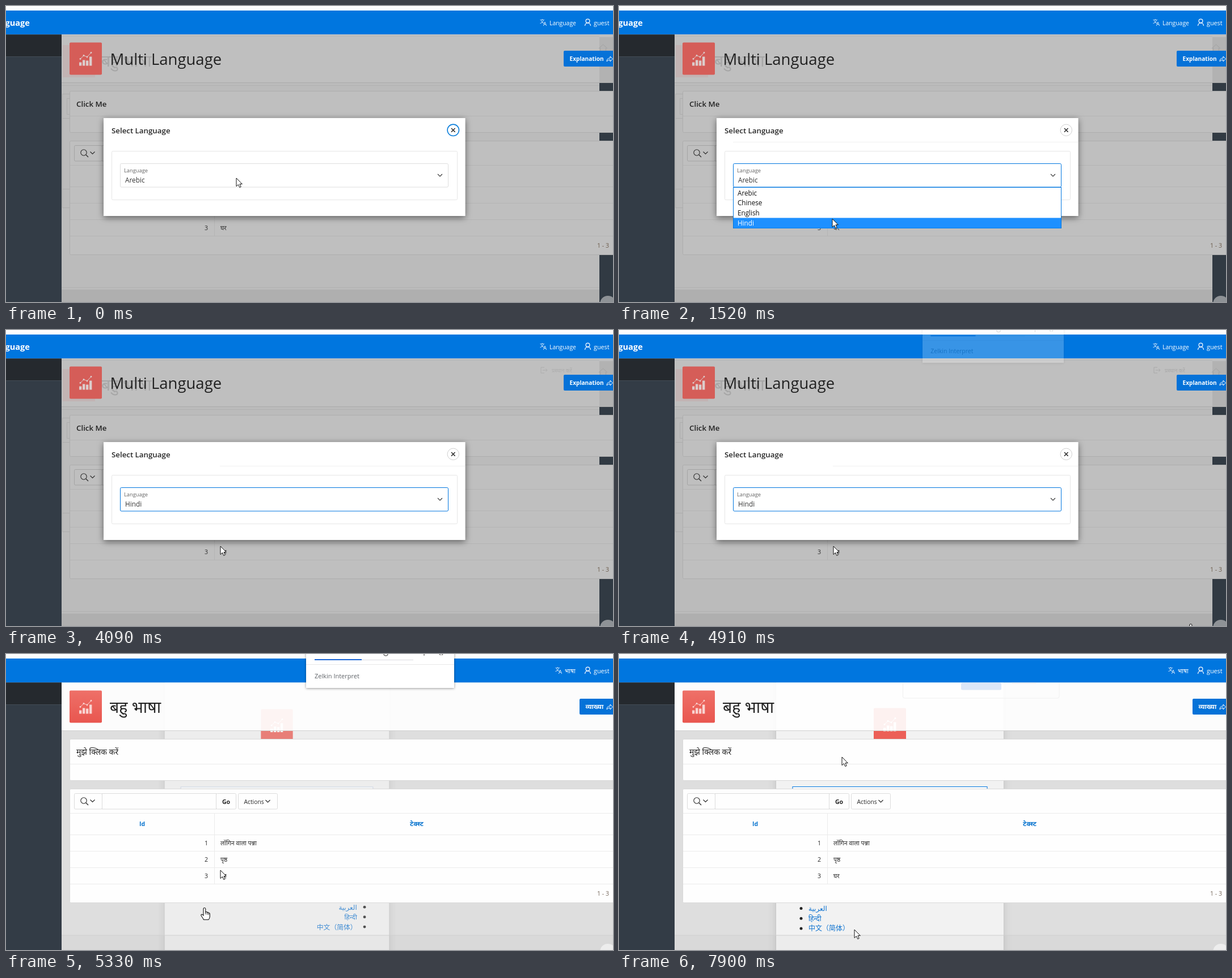
An HTML page for the animation above (8000 ms loop, 1070 by 523 pixels).

```html
<!DOCTYPE html>
<html lang="en">
<head>
<meta charset="utf-8">
<title>Language switch</title>
<style>
html, body { margin: 0; width: 100%; height: 100%; overflow: hidden; background: #fff; }
svg { display: block; width: 100%; height: 100%; }
text { font-family: "Open Sans", "Noto Sans", "Noto Sans Devanagari", "Noto Sans CJK SC", sans-serif; white-space: pre; }
</style>
</head>
<body>
<svg id="stage" viewBox="0 0 1070 523" xmlns="http://www.w3.org/2000/svg"></svg>
<script>
const LOOP = 8000;
const BLUE = '#0076df';

// --- markup helpers ---
const rect = (x, y, w, h, fill, extra = '') =>
  `<rect x="${x}" y="${y}" width="${w}" height="${h}" fill="${fill}" ${extra}/>`;
const box = (x, y, w, h, fill, stroke, r = 2, sw = 1) =>
  rect(x + .5, y + .5, w - 1, h - 1, fill, `stroke="${stroke}" stroke-width="${sw}" rx="${r}"`);
const line = (d, stroke, sw = 1, extra = '') =>
  `<path d="${d}" fill="none" stroke="${stroke}" stroke-width="${sw}" ${extra}/>`;
const text = (x, y, size, str, fill = '#262626', extra = '') =>
  `<text x="${x}" y="${y}" font-size="${size}" fill="${fill}" ${extra}>${str}</text>`;
const group = (id, body, extra = '') => `<g id="${id}" ${extra}>${body}</g>`;
const BOLD = 'font-weight="700"', SEMI = 'font-weight="600"', END = 'text-anchor="end"', MID = 'text-anchor="middle"';
const chevron = (x, y, color) => line(`M${x - 4} ${y - 2}l4 4l4 -4`, color, 1.1);

// Red tile with a small bar chart, 57 px wide
const tile = (x, y, fill, ink) => `<g transform="translate(${x} ${y})">
  ${rect(0, 0, 57, 57, fill, 'rx="2"')}
  ${[[17, 6], [23, 10], [29, 9], [35, 16]].map(([bx, h]) => rect(bx, 41 - h, 4.4, h, ink)).join('')}
  ${line('M19 29L25 23L31 25.5L38 18', ink, 1)}
  ${[[19, 29], [25, 23], [31, 25.5], [38, 18]].map(([cx, cy]) => `<circle cx="${cx}" cy="${cy}" r="1.4" fill="${ink}"/>`).join('')}
</g>`;

const langIcon = x => text(x, 30, 8.5, '文', '#fff') + text(x + 6, 34.5, 9.5, 'A', '#fff');

function header(x, label) {
  return rect(0, 0, 1070, 8, '#fdfdfd') + rect(0, 8, 1070, 42.5, BLUE)
    + langIcon(x) + text(x + 17, 33.5, 10.4, label, '#fff')
    + `<circle cx="1025.5" cy="26.5" r="3.4" fill="none" stroke="#fff" stroke-width="1.2"/>`
    + line('M1020.5 35q.5-5 5-5q4.500 0 5 5', '#fff', 1.2)
    + text(1036, 33.5, 10.8, 'guest', '#fff');
}

const sidebar = () => rect(0, 50.5, 98, 473, '#333c46') + rect(0, 50.5, 98, 39, '#25292e')
  + rect(0, 89, 98, 1, '#434c56');

function button(x, label) {
  return rect(x, 79, 1070 - x + 4, 28, '#0572d8', 'rx="2"')
    + text(x + 10.5, 97, label === 'Explanation' ? 10.1 : 11.2, label, '#fff', BOLD)
    + line('M1059 98q0-6 6-6v-3l4.500 4.500l-4.500 4.500v-3q-4 0-6 3z', '#fff', 1);
}

// Two stacked panels with the report table
function panels(c) {
  const rows = [[1, 'लॉगिन वाला पन्ना'], [2, 'पृष्ठ'], [3, 'घर']];
  return box(112, 150, 970, 74, c.panel, c.edge) + rect(113, 194, 957, 1, c.rule)
    + box(112, 238, 970, 202, c.panel, c.edge)
    + [281, 319, 348, 377, 406].map(y => rect(113, y, 957, 1, c.rule)).join('')
    + rect(367, 282, 1, 124, c.rule)
    + box(120, 246, 50, 28.500, c.panel, c.field)
    + `<circle cx="137" cy="259" r="5.2" fill="none" stroke="${c.ink}" stroke-width="1.1"/>`
    + line('M141 263l4 4', c.ink, 1.2) + chevron(152.500, 259.5, c.ink)
    + box(169, 246, 202, 28.500, c.panel, c.field, 0) + box(370, 246, 36, 28.500, c.panel, c.field)
    + text(388, 264.5, 10.6, 'Go', c.ink, BOLD + MID.padStart(MID.length + 1))
    + box(409, 246, 70, 28.500, c.panel, c.field)
    + text(419.5, 264.5, 10.3, 'Actions', c.ink) + chevron(461.500, 260, c.ink)
    + text(240, 304, 10.4, 'Id', c.link, `${BOLD} ${MID}`)
    + text(724, 304, 11.3, 'टेक्स्ट', c.link, `${BOLD} ${MID}`)
    + rows.map(([n, s], i) => text(356, 338 + i * 29.2, 10.6, n, c.ink, END)
      + text(378, 338 + i * 29.2, 10.600, s, c.ink)).join('')
    + text(1063, 427, 10.6, '1 - 3', c.count, END);
}

const bubble = fill => `<circle cx="1061" cy="526" r="14" fill="${fill}"/>`;

// --- dimmed page with the dialog ---
const dim = { panel: '#bfbfbf', edge: '#adadad', rule: '#b4b4b4', field: '#a3a3a3', ink: '#2c2c2c', link: '#0059a7', count: '#6c5c4c' };

const dimPage = header(941, 'Language') + text(42, 35, 14.6, 'Multi Language', '#fff', `${BOLD} ${END}`)
  + sidebar() + rect(98, 50.5, 972, 473, '#bbbbbb')
  + rect(98, 50.5, 972, 85, '#bfbfbf') + rect(98, 53, 948, 1, '#b7b7b7')
  + rect(1046, 55, 24, 80, '#b2b2b2') + rect(98, 135, 972, 1, '#aaaaaa')
  + rect(98, 140, 948, 1, '#b1b1b1')
  + rect(1046, 136, 24, 388, '#313a43')
  + rect(98, 497, 948, 1, '#b1b1b1') + rect(98, 501, 948, 22, '#afafaf')
  + line('M112 155.500H99.500V356.500H112M112 163.500H107.500V191.500H112M99 198.500H112M99 323.500H112', '#acacac')
  + rect(100, 69, 57, 57, '#c5aaa9', 'opacity=".5"')
  + text(168, 107, 28, 'बहु भाषा', '#a6a6a6')
  + tile(112, 64.5, '#d55d58', '#dccccb')
  + text(183.500, 104, 27.500, 'Multi Language', '#222', 'font-weight="500"')
  + line('M1045 75l7.500-7l7.500 7M1047.500 74v7h10v-7', '#a2a2a2')
  + button(983, 'Explanation')
  + panels(dim) + text(124, 178, 13.3, 'Click Me', '#222', SEMI) + bubble('#8e9296');

const ROWS = ['Arebic', 'Chinese', 'English', 'Hindi'];
const dialog = rect(172, 198, 637.5, 173, '#fff', 'filter="url(#shade)"')
  + group('divider', rect(0, 240, 809, 1, '#f1f1f1'))
  + text(186, 224.500, 13.3, 'Select Language', '#262626', SEMI)
  + `<circle id="close" cx="788.3" cy="219.3" r="10.2" fill="#fff"/>`
  + line('M785 216l6.600 6.600M791.600 216l-6.600 6.600', '#333', 1.5)
  + box(186, 256, 610, 87, '#fff', '#e6e6e6')
  + rect(201.5, 278.5, 578, 41.5, '#fff', 'id="field" rx="2"')
  + text(208, 293.5, 9.3, 'Language', '#606060')
  + `<text id="choice" x="210" y="311.500" font-size="11.8" fill="#333"></text>` + chevron(765, 299, '#333')
  + group('menu', box(201, 320, 579, 73, '#fff', BLUE, 0)
    + rect(202, 0, 577, 18, '#1e90ff', 'id="mark"')
    + ROWS.map((s, i) => text(209, 334.5 + i * 17.8, 11.7, s, '#111', 'class="row"')).join(''));

const signOut = line('M949 66h-6v10h6M946 71h8l-2.500-2.500M954 71l-2.500 2.500', '#a6a6a6')
  + text(962, 75, 9.3, 'प्रस्थान करें', '#a6a6a6');

// --- Hindi page, with the sign-in card behind it ---
const lit = { panel: '#fefefe', edge: '#d9d9d9', rule: '#ebebeb', field: '#dcdcdc', ink: '#262626', link: '#0572ce', count: '#75665a' };

const LINKS = ['العربية', 'हिन्दी', '中文（简体）'];
const links = (dotX, textX, anchor) => LINKS.map((s, i) => {
  const y = 449.5 + i * 17.7;
  return `<circle cx="${dotX}" cy="${y}" r="2.500" fill="#222"/>` + text(textX, y + 4.5, 12, s, '#0d72d0', anchor);
}).join('');

const card = rect(277, 40, 401, 520, '#f2f2f2', 'filter="url(#soft)"')
  + line('M276.500 40V560M678.500 40V560', '#c8c8c8')
  + tile(449, 95.5, '#ec5f57', '#fff')
  + rect(306, 234.500, 343, 40, '#fcfcfc', 'id="login"')
  + group('rtl', links(634, 620.500, END)) + group('ltr', links(321, 334, ''));

const hindiPage = rect(98, 50, 972, 473, '#dedede') + group('card', card)
  + rect(98, 497, 972, 26, '#000', 'opacity=".025"') + rect(98, 496.5, 972, 1, '#cfcfcf')
  + header(968, 'भाषा') + sidebar()
  + rect(98, 50.5, 972, 84.5, '#fff', 'opacity=".915"') + rect(98, 135, 972, 1, '#d0d0d0')
  + tile(112, 64.5, 'url(#red)', '#f9d3d0')
  + text(183, 104, 28.500, 'बहु भाषा', '#222')
  + button(1011, 'व्याख्या') + panels(lit)
  + text(124, 178, 14, 'मुझे क्लिक करें', '#222') + bubble('#ededed');

const popup = rect(529, -20, 261, 80, '#fff', 'filter="url(#lift)"')
  + rect(529, 18, 261, 1, '#e8e8e8') + rect(627, 10, 91, 1, '#dadce0') + rect(544, 9, 83, 2, '#1a66d6')
  + line('M666 0q0 3 3.500 3q3.500 0 3.500-3M737 0v3M764 0l2 2M770 0l-2 2', '#666', 1.3)
  + text(544, 42.500, 11, 'Zelkin Interpret', '#5f6368', 'font-weight="500"');

const popupTrace = line('M500.500 51V75q0 3 3 3H773q3 0 3-3V51', '#f0f0f0')
  + rect(603, 51, 71, 12.5, '#dce7f8', 'rx="2"') + line('M692 51.500h43', '#eaeaf0', 1.5);

const ARROW = `<path d="M0 0V14.600L3.500 11.500L5.800 16.600L8.200 15.500L6 10.600H10.300Z" fill="#fff" stroke="#111" stroke-width="1"/>`;
const HAND = `<path d="M-2 13V1.500Q-2-.5 0-.5Q1.800-.5 1.800 1.500V7Q4 5.800 4.700 7.700Q6.800 6.800 7.200 8.700Q9.300 8.300 9.300 10.500V15Q9 18 7 20.500H-1.500Q-2.500 18-5.500 14Q-7 11.500-5 11Q-3.600 11-2 13Z" fill="#fff" stroke="#111" stroke-width="1.1"/>${line('M1.800 7v4M4.700 8v3.500M7.200 9v3', '#111', .9)}`;
const BEAM = line('M-3-8h2q1 0 1 1q0-1 1-1h2M0-7V7M-3 8h2q1 0 1-1q0 1 1 1h2', '#111', 1.1);

const shadow = (id, dy, blur, a) => `<filter id="${id}" x="-15%" y="-25%" width="130%" height="150%">
  <feDropShadow dx="0" dy="${dy}" stdDeviation="${blur}" flood-color="#000" flood-opacity="${a}"/></filter>`;

const $ = id => document.getElementById(id);
$('stage').innerHTML = `<defs>${shadow('shade', 3, 6, .5)}${shadow('soft', 0, 8, .12)}${shadow('lift', 1, 2, .4)}
  <linearGradient id="red" x2="0" y2="1"><stop stop-color="#ee7068"/><stop offset="1" stop-color="#e9564f"/></linearGradient></defs>`
  + group('before', dimPage + dialog + group('signOut', signOut)) + group('after', hindiPage + group('trace', popupTrace))
  + group('popup', popup) + group('hand', HAND) + group('second', ARROW) + group('arrow', ARROW) + group('beam', BEAM);

// --- timing ---
// Bursts of motion: first step, last step, number of steps
const BURSTS = [[430, 1400, 8], [1520, 2520, 8], [3660, 3660, 1], [3940, 4210, 3], [4610, 5580, 8], [5720, 6650, 8], [6770, 7770, 7], [7900, 7900, 1]];

function snap(t) {
  let last = 0;
  for (const [a, b, n] of BURSTS) {
    if (t < a) break;
    const gap = n > 1 ? (b - a) / (n - 1) : 1;
    last = a + Math.min(n - 1, Math.floor((t - a) / gap + 1e-6)) * gap;
  }
  return last;
}

// Linear path through [time, ...values] keys
function track(keys, t) {
  const i = keys.findIndex(k => k[0] > t);
  if (i === 0) return keys[0].slice(1);
  if (i < 0) return keys[keys.length - 1].slice(1);
  const a = keys[i - 1], b = keys[i], p = (t - a[0]) / (b[0] - a[0]);
  return a.slice(1).map((v, j) => v + (b[j + 1] - v) * p);
}

const POINTER = [[290, 406, 304], [1400, 376, 374], [1520, 376, 376], [1650, 378, 382], [5580, 378, 382],
  [6650, 152, 172], [6930, 133, 172], [7110, 133, 172], [7770, 393, 182]];
const HAND_PATH = [[4750, 1008, 521], [4890, 1008, 520], [5300, 350, 449], [5580, 350, 449], [6650, 605, 464]];
const POPUP = [[4610, 0, .93], [4887, .22, .954], [5300, 1, 1]];
const CARD = [[4750, 0, .95], [5303, .75, .9875], [5580, 1, 1]];
const SIGN_OUT = [[3500, 0], [4210, .9]];

const show = (id, on) => $(id).style.display = on ? '' : 'none';
const move = (id, x, y) => $(id).setAttribute('transform', `translate(${x} ${y})`);
const scaleAt = (id, s, cx, cy) => $(id).setAttribute('transform', `translate(${cx} ${cy}) scale(${s}) translate(${-cx} ${-cy})`);
const rows = document.querySelectorAll('.row');

function draw(t) {
  const s = snap(t);
  const hindi = t >= 5050, open = t >= 150 && t < 1650, done = t >= 7900;
  show('before', !hindi);
  show('after', hindi);

  // dialog
  show('menu', open);
  show('divider', t >= 150);
  move('divider', open ? 201 : 377, 0);
  $('divider').firstChild.setAttribute('width', open ? 608 : 432);
  $('close').setAttribute('stroke', t < 150 ? '#0d7fdb' : '#cfcfcf');
  $('close').setAttribute('stroke-width', t < 150 ? 1.6 : 1);
  $('field').setAttribute('stroke', t < 150 ? '#dedede' : BLUE);
  $('choice').textContent = t < 1650 ? 'Arebic' : 'Hindi';
  $('signOut').setAttribute('opacity', track(SIGN_OUT, s)[0]);

  // pointers
  const [x, y] = track(POINTER, s);
  const overText = hindi && x < 206 && y < 188;
  move('arrow', x, y);
  move('beam', x, y);
  show('arrow', !overText);
  show('beam', overText);
  move('hand', ...track(HAND_PATH, s));
  show('hand', s >= 4880 && !done);
  move('second', 415, 487);
  show('second', done);

  const active = Math.max(0, Math.min(3, Math.floor((y - 320.5) / 17.8)));
  $('mark').setAttribute('y', 321 + active * 17.8);
  rows.forEach((r, i) => r.setAttribute('fill', i === active ? '#fff' : '#111'));

  // popup and sign-in card
  const [pa, ps] = track(POPUP, s);
  show('popup', !done);
  $('popup').setAttribute('opacity', pa);
  scaleAt('popup', ps, 659.5, 15);
  const [ca, cs] = track(CARD, s);
  $('card').setAttribute('opacity', ca);
  scaleAt('card', cs, 477.5, 261.5);
  $('login').setAttribute('stroke', done ? BLUE : '#c9d3e6');
  show('rtl', !done);
  show('ltr', done);
  show('trace', done);
}

function tick() {
  draw(performance.now() % LOOP);
  requestAnimationFrame(tick);
}
tick();
</script>
</body>
</html>
```
